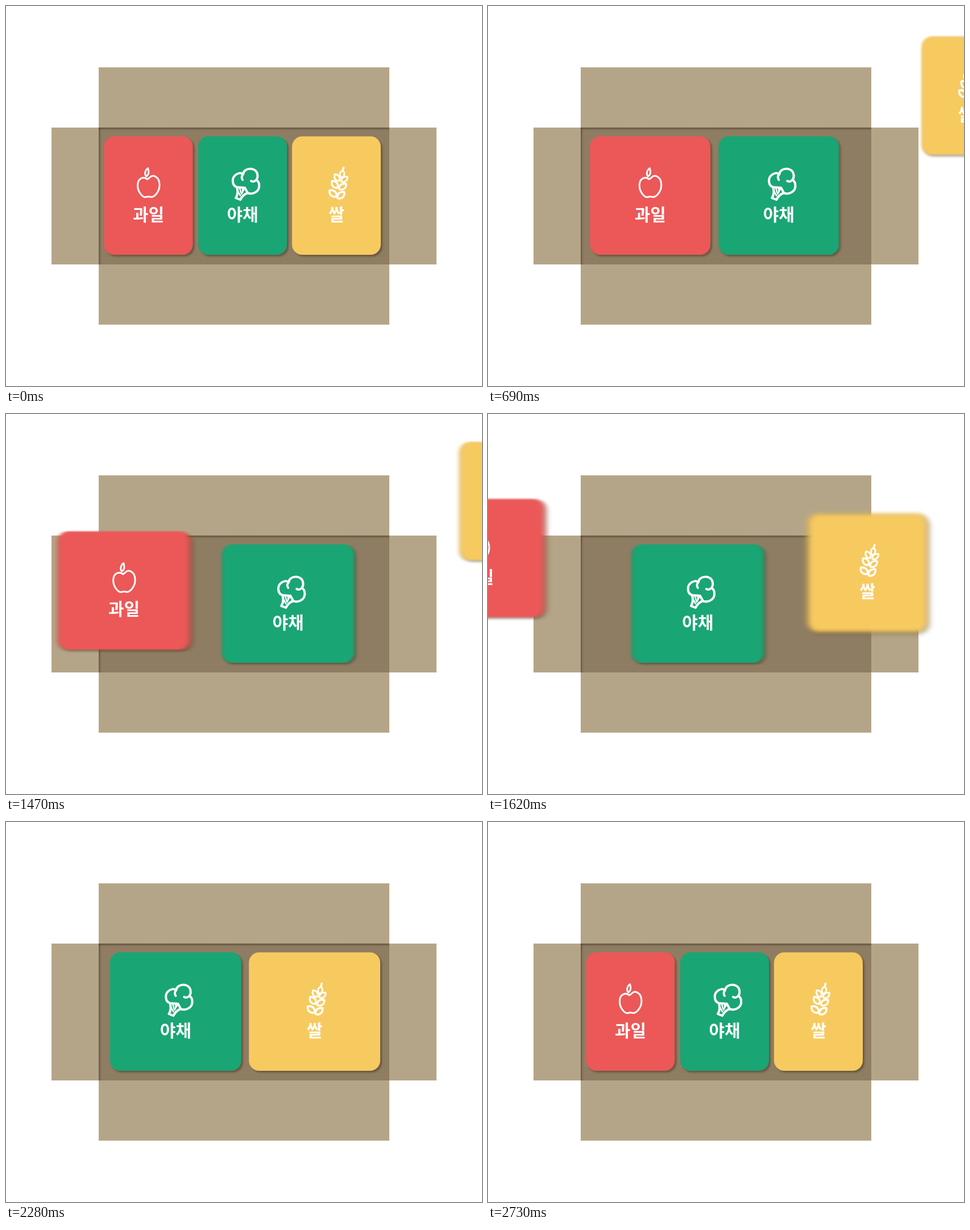
These frames come from a looping animation (837x669 px, 3.03 s). An HTML page:

```html
<!DOCTYPE html>
<html lang="ko">
<head>
<meta charset="utf-8">
<title>Box panels</title>
<style>
  html, body { margin: 0; width: 100%; height: 100%; overflow: hidden; background: #fff; }
  svg { display: block; width: 837px; height: 669px; }
  text { font: bold 30px "Noto Sans CJK KR", "Noto Sans CJK", sans-serif; text-anchor: middle; fill: #fff; }
  .icon { fill: none; stroke: #fff; stroke-width: 4; stroke-linecap: round; stroke-linejoin: round; }
  filter { color-interpolation-filters: sRGB; }
</style>
</head>
<body>
<svg viewBox="0 0 837 669">
  <defs>
    <linearGradient id="topShade" x2="0" y2="1">
      <stop stop-color="#3d2f1c" stop-opacity=".55"/>
      <stop offset="1" stop-color="#3d2f1c" stop-opacity="0"/>
    </linearGradient>
    <linearGradient id="leftShade">
      <stop stop-color="#3d2f1c" stop-opacity=".45"/>
      <stop offset="1" stop-color="#3d2f1c" stop-opacity="0"/>
    </linearGradient>
    <path id="grain" d="M0 8C-7 4-6-4 0-8C6-4 7 4 0 8Z"/>
  </defs>

  <path fill="#b5a588" d="M163 108h511v106h83v241h-83v106H163V455H80V214h83z"/>
  <path fill="#8f7d63" d="M163 214h511v241H163z"/>
  <path fill="url(#topShade)" d="M163 214h511v5H163z"/>
  <path fill="url(#leftShade)" d="M163 214h5v241h-5z"/>

  <g id="fruit">
    <rect fill="#eb5857"/>
    <g class="content">
      <path class="icon" stroke-width="3" style="stroke-width:3" d="M-2 305C-8 300-19 302-19 316
        C-19 328-9 339-3 336Q0 335 3 336C10 338 19.5 327 19.5 315C19.5 302 9 295 2 302Q0 304-2 305Z
        M-4 300C-8 295-5 288-1 285.500C1 291 1 297-4 300Z"/>
      <text y="377.500">과일</text>
    </g>
  </g>

  <g id="vegetable">
    <rect fill="#1aa574"/>
    <g class="content">
      <path class="icon" d="M-10 319C-19 316-19 303-13 298C-9 294-3 293 1 296C2 284 24 283 26 296
        C27 301 26 304 24 306C31 310 31 322 24 327C19 331 12 331 9 329C3 331-1 335-4 341L-12 338
        C-8 332-8 326-10 319L4 320L9 329M1 296C-2 299-2 303 0 306M24 306C22 309 18 310 15 308"/>
      <path class="icon" style="stroke-width:2.500" d="M-5 321L-2 331L4 320M-8 326L-4 334M0 321V326"/>
      <text y="377.500">야채</text>
    </g>
  </g>

  <g id="rice">
    <rect fill="#f7ca60"/>
    <g class="content">
      <g class="icon" style="stroke-width:3.500">
        <path d="M12.500 284.500L11 290"/>
        <use href="#grain" transform="translate(10 296) rotate(12) scale(.8)"/>
        <use href="#grain" transform="translate(1 302) rotate(-32) scale(.85)"/>
        <use href="#grain" transform="translate(14 305) rotate(52) scale(.85)"/>
        <use href="#grain" transform="translate(-3 314) rotate(-38) scale(.95)"/>
        <use href="#grain" transform="translate(11 318) rotate(55) scale(.95)"/>
        <use href="#grain" transform="translate(-6 330) rotate(-48)"/>
        <use href="#grain" transform="translate(8 333) rotate(48)"/>
      </g>
      <text y="377.500">쌀</text>
    </g>
  </g>
</svg>

<script>
const LOOP = 3030, STEP = 30;
const TOP = 229.5, HEIGHT = 208.5, RADIUS = 18;
const NARROW = 156, WIDE = 233;

// Cubic-bezier easing, solved by bisection.
function bezier(x1, y1, x2, y2) {
  const at = (a, b, s) => 3 * a * s * (1 - s) ** 2 + 3 * b * s * s * (1 - s) + s ** 3;
  return p => {
    if (p <= 0) return 0;
    if (p >= 1) return 1;
    let low = 0, high = 1;
    for (let i = 0; i < 24; i++) {
      const mid = (low + high) / 2;
      if (at(x1, x2, mid) < p) low = mid; else high = mid;
    }
    return at(y1, y2, low);
  };
}

const smooth = bezier(.42, 0, .58, 1);
const gentle = bezier(.35, .2, .65, .8);
const rise = bezier(.55, 0, .5, 1);
const drop = bezier(.7, 0, .4, 1);

// A value over time; each move is [start, duration, destination, easing].
const track = (from, ...moves) => t => moves.reduce(
  (value, [start, length, to, ease = smooth]) => value + (to - value) * ease((t - start) / length), from);

const first = (to, ease, length = 660) => [270, length, to, ease];
const second = (to, ease) => [1320, 480, to, ease];
const third = to => [2220, 510, to];

const panels = [
  { id: 'fruit',
    x: track(250.5, first(298.5), second(-148), third(250.5)),
    y: track(0, second(-113), third(0)),
    width: track(NARROW, first(WIDE), [1810, 1, NARROW]) },
  { id: 'vegetable',
    x: track(416, first(547.5), second(295), third(416)),
    y: track(0),
    width: track(NARROW, first(WIDE), third(NARROW)) },
  { id: 'rice',
    x: track(581, first(971, gentle), second(541.5), third(581)),
    y: track(0, first(-201, rise, 570), second(0, drop)),
    width: track(NARROW, second(WIDE), third(NARROW)) }
];

const defs = document.querySelector('defs');
for (const panel of panels) {
  const group = document.getElementById(panel.id);
  defs.insertAdjacentHTML('beforeend',
    `<filter id="${panel.id}Blur" x="-20%" y="-20%" width="140%" height="140%">
      <feGaussianBlur stdDeviation="0"/>
      <feDropShadow dx="3" dy="3" stdDeviation="1.5" flood-color="#30220f" flood-opacity=".4"/>
    </filter>`);
  panel.blur = defs.lastElementChild.firstElementChild;
  panel.rect = group.querySelector('rect');
  panel.content = group.querySelector('.content');
  const fixed = { height: HEIGHT, rx: RADIUS, filter: `url(#${panel.id}Blur)` };
  for (const name in fixed) panel.rect.setAttribute(name, fixed[name]);
}

// Motion blur spread from the distance covered in one step.
const spread = (value, t) =>
  (Math.abs(value(t + STEP / 2) - value(t - STEP / 2)) * .13).toFixed(2);

function draw(t) {
  for (const { x, y, width, rect, content, blur } of panels) {
    const w = width(t);
    rect.setAttribute('x', x(t) - w / 2);
    rect.setAttribute('y', TOP + y(t));
    rect.setAttribute('width', w);
    content.setAttribute('transform', `translate(${x(t)} ${y(t)})`);
    blur.setAttribute('stdDeviation', `${spread(x, t)} ${spread(y, t)}`);
  }
}

let begin;
function tick(now) {
  begin ??= now;
  draw(Math.floor(((now - begin + 1) % LOOP) / STEP) * STEP);
  requestAnimationFrame(tick);
}
draw(0);
requestAnimationFrame(tick);
</script>
</body>
</html>
```
